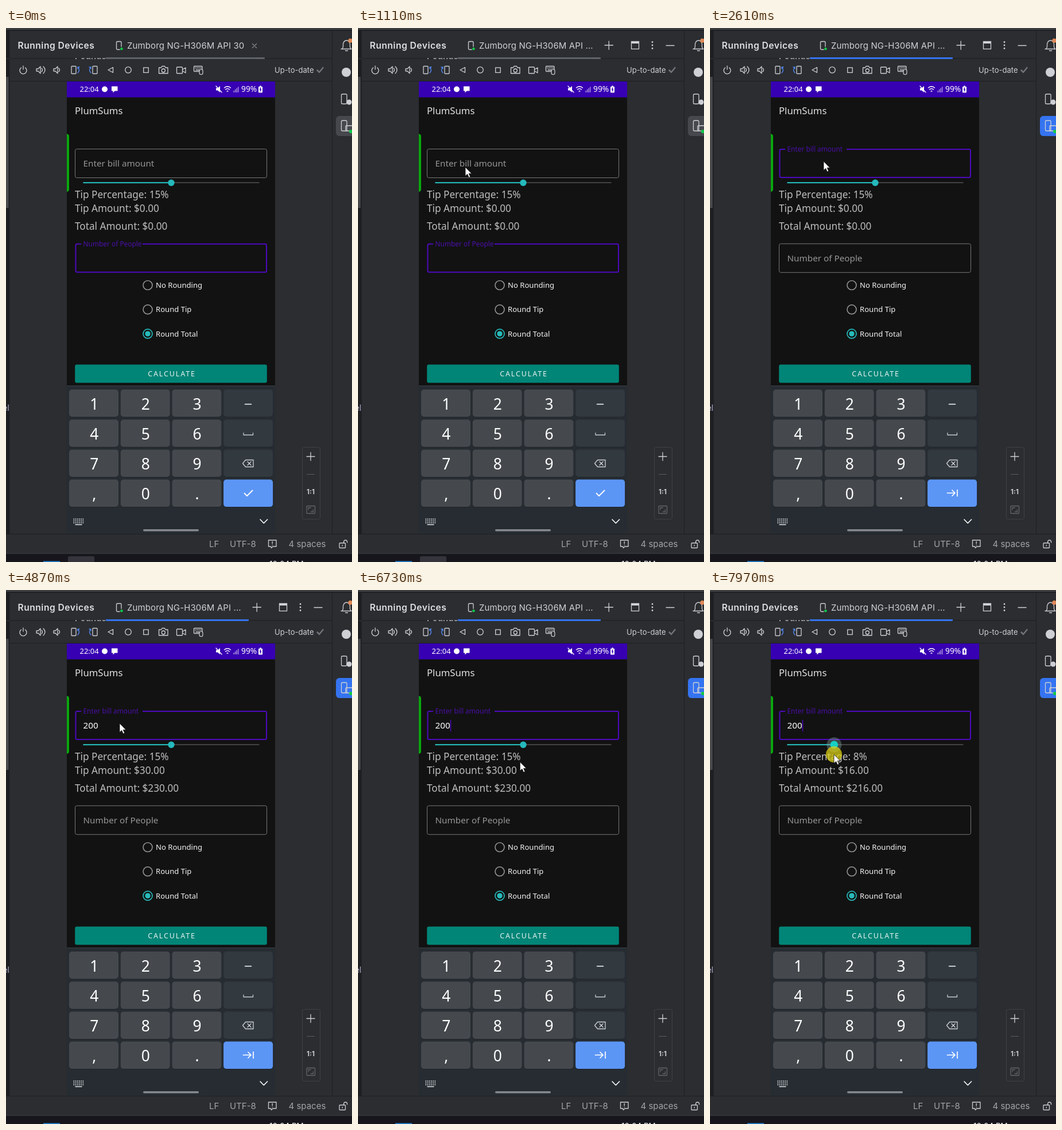
Write an HTML page that moves like this. It is 603x929 px and loops after 8000 ms.

```html
<!DOCTYPE html>
<html lang="en">
<head>
<meta charset="utf-8">
<title>Running Devices</title>
<style>
html,body{margin:0;width:100%;height:100%;overflow:hidden;background:#2b2d30}
svg{display:block;width:603px;height:929px}
text{white-space:pre}
.ide{font-family:Inter,sans-serif;fill:#ced0d6}
.app{font-family:"Noto Sans",sans-serif}
.ln{fill:none;stroke:#ced0d6;stroke-width:1.3;stroke-linejoin:round;stroke-linecap:round}
</style>
</head>
<body>
<svg id="stage" viewBox="0 0 603 929" xmlns="http://www.w3.org/2000/svg"></svg>
<script>
const LOOP = 8000;
const TITLE = 'Zumborg NG-H306M API ';
const rect = (x, y, w, h, fill, r = 0, more = '') =>
  `<rect x="${x}" y="${y}" width="${w}" height="${h}" rx="${r}" fill="${fill}" ${more}/>`;
const circ = (x, y, r, fill, more = '') => `<circle cx="${x}" cy="${y}" r="${r}" fill="${fill}" ${more}/>`;
const line = (d, more = '') => `<path class="ln" d="${d}" ${more}/>`;
const text = (cls, x, y, size, str, more = '') =>
  `<text class="${cls}" x="${x}" y="${y}" font-size="${size}" ${more}>${str}</text>`;
const hollow = (x, y, w, h, r = 0, more = '') => rect(x, y, w, h, 'none', r, `stroke="#ced0d6" stroke-width="1.3" ${more}`);

function ideFrame() {
  return rect(0, 0, 603, 929, '#2b2d30')
    + rect(0, 0, 603, 3.5, '#3c3d41') + rect(0, 3.5, 603, 1.5, '#1b1c1f')
    + rect(0, 5, 6.5, 875, '#1e1f22') + rect(0, 53, 6, 1, '#36383c')
    + rect(0, 85, 4.5, 228, '#47494d')
    + text('ide', 6, 666, 14, 'el', 'text-anchor="end" style="fill:#b3aecb"')
    + rect(7, 52.5, 561, 1, '#1e1f22') + rect(7, 92, 561, 1, '#1e1f22')
    + rect(568, 5, 1, 875, '#1e1f22')
    + rect(0, 880, 603, 1, '#1e1f22')
    + rect(0, 914, 603, 15, '#17161d') + rect(0, 913.5, 603, 1.2, '#3c3d43')
    + rect(65, 927.5, 29, 1.5, '#1f86e0')
    + text('ide', 459, 937, 13.5, '10:04 PM', 'style="fill:#fff"')
    + '<clipPath id="strip"><rect x="115" y="52.6" width="65" height="2.2"/></clipPath>'
    + text('ide', 120, 54, 15, 'Pounds', 'font-weight="600" clip-path="url(#strip)"')
    + text('ide', 20.5, 35.7, 15.6, 'Running Devices', 'font-weight="600" letter-spacing=".5" style="fill:#dfe1e5"')
    + hollow(192.5, 23.5, 8.5, 14, 1.5) + circ(201.5, 36, 3.2, '#2b2d30') + circ(201.5, 36.2, 2.3, '#12c94a');
}

function toolbar() {
  const speaker = x => line(`M${x - 6} 71h3l4-4v12l-4-4h-3z`) + line(`M${x + 3} 70q3 3 0 6`);
  const turn = (x, dir) => `<g transform="translate(${x} 73) scale(${dir} 1)">`
    + hollow(-7, -6.5, 8, 13, 1) + line('M4 -5q5 5 0 10M4 -5h3M4 -5v3', 'style="stroke:#548af7"') + '</g>';
  return line('M26.5 69a6 6 0 1 0 7 0M30 66v6')
    + speaker(59) + line('M65 67q6 6 0 12') + speaker(89)
    + turn(121, 1) + turn(152, -1)
    + line('M178 73l8.5-4.5v9z') + circ(213, 73, 5.3, 'none', 'class="ln"')
    + hollow(239.7, 69, 8.5, 8.5)
    + line('M266.5 69h4l1.5-2.5h4.5l1.5 2.5h4v10h-15.5z') + circ(274.3, 74, 3, 'none', 'class="ln"')
    + hollow(297.5, 68, 10, 11, 1) + line('M308 72l5-3v9l-5-3')
    + hollow(327.5, 66.5, 14.5, 9, 1) + line('M330 69.5h1m2 0h1m2 0h1m2 0h1M331 73h7')
    + rect(337, 72, 6, 9, '#2b2d30', 3, 'stroke="#ced0d6" stroke-width="1.2"')
    + text('ide', 468, 77.5, 13, 'Up-to-date')
    + line('M542.5 73.5l3.5 3.5l6.5-8', 'style="stroke:#6f737a;stroke-width:2.5"');
}

function sideAndFooter() {
  return line('M584 36.5h18M586 36l1.5-3v-5q1-6 6-6.5q5 .5 6 6.5v5l1.5 3M591.5 39.5h4')
    + circ(600, 22, 3.7, '#e08855')
    + circ(593, 77, 8, '#ced0d6')
    + hollow(584.5, 115, 9.5, 17, 2) + circ(598, 129, 4.5, '#ced0d6')
    + rect(516.5, 729.5, 31, 125, '#2b2d30', 3, 'stroke="#3f4145"')
    + line('M524 745.5h14M531 738.5v14') + line('M524.5 776.5h13', 'style="stroke:#5a5d63;stroke-width:1"')
    + text('ide', 531, 811, 11.5, '1:1', 'font-weight="700" text-anchor="middle"')
    + `<g opacity=".33">${hollow(524, 831.5, 14.5, 13, 1)}${line('M527 838v-3.5h4M535.5 838v3.5h-4')}</g>`
    + `<g opacity=".72">${text('ide', 354, 903, 15, 'LF')}${text('ide', 390, 903, 15, 'UTF-8')}${text('ide', 492.5, 903, 15, '4 spaces')}</g>`
    + line('M457.5 891h13.5v11h-6l-2.5 2.5l-1-2.5h-4zM464.2 893.5v3.5M464.2 899.3v.2')
    + hollow(581, 896, 10.5, 8.5, 1) + line('M588.5 896v-2q.5-3 3.2-3q3 0 3 4M586.2 899.5v1.5');
}

function keyboard() {
  const white = 'style="stroke:#fff;stroke-width:1.6"';
  const keys = ['1', '2', '3', '', '4', '5', '6', '', '7', '8', '9', '', ',', '0', '.', ''];
  let s = rect(106, 622, 363, 258, '#262c32') + rect(106, 622, 363, 1, '#3a4046');
  keys.forEach((k, i) => {
    const col = i % 4, x = 110 + col * 89.7, y = 629 + (i >> 2) * 52.2;
    const fill = i === 15 ? '#5c96f5' : col === 3 ? '#32393f' : '#45494d';
    s += rect(x, y + .8, 86, 47.5, '#1d2226', 5) + rect(x, y, 86, 47.5, fill, 5);
    if (k) s += text('app', x + 43.7, y + 34.8, 26.4, k, 'text-anchor="middle" fill="#fff"');
  });
  s += line('M416.5 654.5h11', white) + line('M414 704.5v3.5h16.5v-3.5', 'style="stroke:#c5c9cc"')
    + line('M417.5 751.5h13.5v12h-13.5l-5-6zM421 754.5l6 6m0-6l-6 6')
    + line('M443 855l6.3 6.5l6.3-6.5', white)
    + rect(239, 872, 97, 3.5, '#858a8e', 1.7);
  for (let r = 0; r < 3; r++)
    for (let c = 0; c < 6; c++) s += rect(117.5 + c * 3.2, 853.5 + r * 3.2, 1.7, 1.7, '#e0e3e5');
  return s + line('M121 864h11', 'style="stroke:#e0e3e5;stroke-width:1.5"');
}

function phone() {
  const w = '#fff', stroke = 'style="stroke:#fff"';
  let s = rect(106, 93, 363, 787, '#121212') + rect(106, 93, 363, 27.6, '#3700b3')
    + text('app', 128.5, 111, 13, '22:04', 'fill="#fff"')
    + circ(172, 106.5, 5, w) + `<path d="M184 101.5h10.5v8h-5l-3 3v-3h-2.5z" fill="#fff"/>`
    + `<path d="M366 104.5h3l4-3.5v11l-4-3.5h-3z" fill="#fff"/>` + line('M366 101l10 11', stroke)
    + line('M380.5 104q5.5-4.5 11 0M382.5 107q3.5-3 7 0M385 110q1-1 2 0', stroke)
    + `<g opacity=".55">${[0, 1, 2, 3].map(i => rect(396.5 + i * 2.5, 109 - i * 2.2, 1.5, 3 + i * 2.2, w)).join('')}</g>`
    + text('app', 410, 111.3, 13.8, '99%', 'fill="#fff"')
    + rect(440, 102, 7, 10.5, w, 1) + rect(442, 100.5, 3, 2, w) + line('M444 104l-1.5 3h2l-1.5 3', 'style="stroke:#3700b3"')
    + text('app', 120, 150, 16.7, 'PlumSums', 'fill="#e2e2e2"')
    + '<path d="M106 184q4 1 4 4v93q0 3-4 4z" fill="#08a80c"/>';
  ['No Rounding', 'Round Tip', 'Round Total'].forEach((label, i) => {
    const y = 447.5 + i * 42.2, on = i === 2;
    s += circ(247, y, 8, 'none', `stroke="${on ? '#27b9ba' : '#8d8d8d'}" stroke-width="1.7"`)
      + (on ? circ(247, y, 4.7, '#27b9ba') : '')
      + text('app', 261, y + 4.7, 13.1, label, 'fill="#f4f4f4"');
  });
  return s + rect(120.2, 585.4, 334.6, 31.8, '#018577', 3)
    + text('app', 289, 605.7, 12.6, 'CALCULATE', 'text-anchor="middle" font-weight="500" letter-spacing="1.8" fill="#e8f3f1"')
    + keyboard();
}

const stage = document.getElementById('stage');
stage.innerHTML = ideFrame() + toolbar() + sideAndFooter() + phone() + '<g id="live"></g>';
const live = document.getElementById('live');

// time, x, y of the pointer tip
const PATH = [[160, 131, 930], [400, 121, 760], [560, 122, 588], [750, 205, 410], [960, 187, 246],
  [1110, 187, 242], [1400, 198, 232], [5390, 198, 232], [5890, 321, 369], [6140, 328, 379],
  [6240, 328, 379], [6960, 268, 274], [7480, 266, 273], [7880, 216, 286]];
const between = (t, a, b) => t >= a && t < b;
const clamp = v => Math.max(0, Math.min(1, v));
const mix = (a, b, k) => a + (b - a) * k;
const ease = k => k * k * (3 - 2 * k);

function pointer(t) {
  const i = PATH.findIndex(p => p[0] > t);
  if (i === 0) return PATH[0].slice(1);
  if (i < 0) return PATH[PATH.length - 1].slice(1);
  const a = PATH[i - 1], b = PATH[i], k = (t - a[0]) / (b[0] - a[0]);
  const e = a[0] < 960 ? k : ease(k);
  return [mix(a[1], b[1], e), mix(a[2], b[2], e)];
}

// up is how far the label has floated; a floated label means focus
function field(y, label, up) {
  const purple = '#4d0abd', focused = up > .5, bottom = y + 50;
  const outline = focused
    ? `M131 ${y + .5}H124q-2.5 0-2.5 2.5V${bottom - 3}q0 2.5 2.5 2.5H451.500q2.5 0 2.5-2.5V${y + 3}q0-2.5-2.5-2.5H238`
    : `M123.500 ${y}H451.500q3 0 3 3V${bottom - 3}q0 3-3 3H123.500q-3 0-3-3V${y + 3}q0-3 3-3z`;
  return `<path d="${outline}" fill="none" stroke="${focused ? purple : '#777'}" stroke-width="${focused ? 2 : 1}"/>`
    + text('app', 134.5, mix(y + 30.5, y + 4.5, up), mix(15.25, 11.9, up), label, `fill="${focused ? '#4a0fa8' : '#969696'}"`);
}

function header(t) {
  const hover = t >= 450, active = t >= 1560;
  let s = text('ide', 211, 35.5, 15, TITLE + (hover ? '...' : '30'), 'letter-spacing=".12"')
    + rect(174, 51, hover ? 249 : 277, 3, active ? '#3574f0' : '#5f6268', 1)
    + rect(575, 153, 36, 35, active ? '#3574f0' : '#46484d', 6)
    + hollow(584.5, 161, 9.5, 18, 2) + hollow(592, 170, 12, 9, 1) + circ(601, 180, 3, '#12c94a');
  s += hover
    ? line('M430 30h14.5M437.2 23v14.5M537 30.5h14') + hollow(476.5, 23.5, 13, 13) + rect(476, 23, 14, 4, '#ced0d6')
      + [24.5, 30, 35.5].map(y => circ(513, y, 1.4, '#ced0d6')).join('')
    : line('M429.5 27.5l7 7m0-7l-7 7', 'style="stroke:#868a91"');
  return active ? s : s + rect(108, 919, 46, 14, '#35343c', 3);
}

function draw(t) {
  const focus = ease(clamp((t - 1880) / 170));
  const value = t < 3880 ? '' : t < 4200 ? '2' : t < 4400 ? '20' : '200';
  const bill = t < 3930 ? 0 : t < 4250 ? 2 : t < 4450 ? 20 : 200;
  const [px, py] = pointer(t);

  const drag = t >= 7560;
  const pct = drag ? Math.round((pointer(t - 60)[0] - 134.5) / 10.23) : 15;
  const knob = 134.5 + pct * 10.23;
  const total = Math.round(bill * (1 + pct / 100));
  const tip = bill * pct / 100;
  const caret = between(t, 2080, 2600) || between(t, 3220, 3720) || between(t, 3880, 4870)
    || between(t, 5390, 5880) || between(t, 6400, 6920) || t >= 7500;

  let s = header(t)
    + field(210.5, 'Enter bill amount', focus)
    + field(375.3, 'Number of People', 1 - focus)
    + text('app', 134.5, 241.3, 15.3, value, 'fill="#fff"');
  if (caret) s += rect(134.5 + value.length * 8.75, 226, 1.5, 20, '#4d0abd');

  const press = ease(clamp((t - 7400) / 160));
  s += rect(134.5, 268.2, 307, 1.8, '#474747') + rect(134.5, 268, knob - 134.5, 2.2, '#25b5b5');
  if (press) s += circ(knob, 269.2, 6 + 7 * press, '#8aa5a5', 'fill-opacity=".38"');
  s += circ(knob, 269.2, 5.7 + press, press ? '#16d0c4' : '#25b9bc');

  const info = (y, str) => text('app', 120, y, 17.2, str, 'fill="#bdbdbd"');
  s += info(296, `Tip Percentage: ${pct}%`)
    + info(319.5, `Tip Amount: $${tip.toFixed(2)}`)
    + info(350.5, `Total Amount: $${total.toFixed(2)}`);

  if (t >= 2150) s += line('M413.5 809h13.5m-5-5l5 5l-5 5M431 803.5v11', 'style="stroke:#fff;stroke-width:1.7"');
  else s += line('M415.5 809.5l4.5 4.5l9.5-9.5', 'style="stroke:#fff;stroke-width:1.8"');

  if (between(t, 1500, 1640) || t >= 7400) s += circ(px, py, 14, '#d8ce14', 'fill-opacity=".75"');
  if (t >= 160)
    s += `<path transform="translate(${px} ${py})" d="M0 0V15.5L3.6 12.2L6.2 18L8.7 16.9L6.2 11.2H11z" fill="#fff" stroke="#111" stroke-width=".8"/>`;
  live.innerHTML = s;
}

const start = performance.now();
function tick() {
  draw((performance.now() - start) % LOOP);
  requestAnimationFrame(tick);
}
draw(0);
tick();
</script>
</body>
</html>
```
